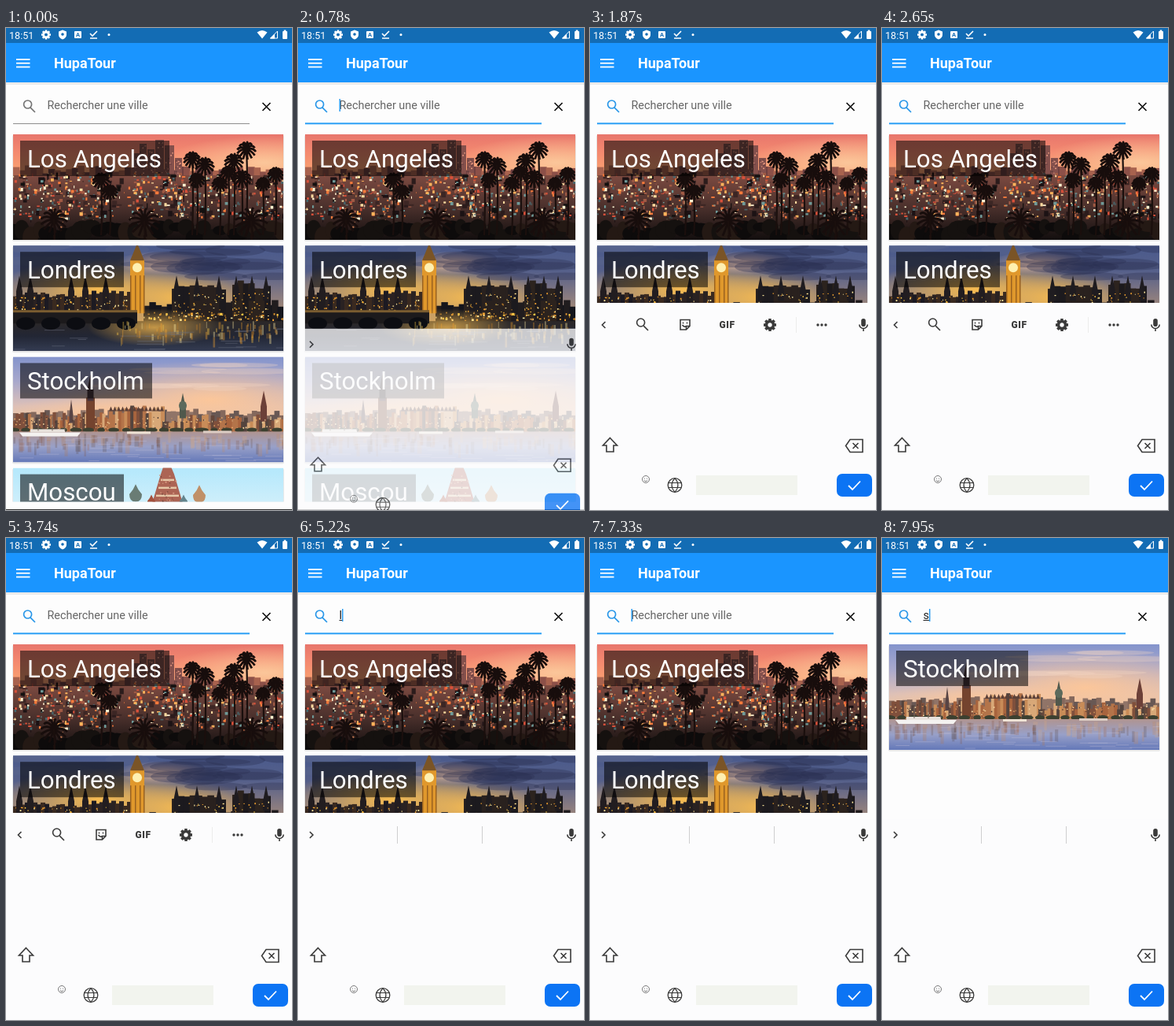
Animation, 364 px wide and 612 px high, one loop 8000 ms. Source, as an HTML page:

```html
<!DOCTYPE html>
<html lang="fr">
<head>
<meta charset="utf-8">
<title>HupaTour</title>
<style>
  html, body { margin: 0; width: 100%; height: 100%; overflow: hidden; background: #fdfdfd; }
  svg { display: block; width: 100%; height: 100%; font-family: Roboto, Arial, sans-serif; }
  .line { fill: none; stroke: #3a3a3a; stroke-width: 1.6; }
  .name { font-size: 31.3px; fill: #fff; }
  .field { font-size: 14.4px; }
</style>
</head>
<body>
<svg id="stage" viewBox="0 0 364 612"></svg>
<script>
const LOOP = 8000, PITCH = 141.2;
const BLUE = '#1a95ff', DARK_BLUE = '#136cb4', INK = '#3a3a3a';

let seed = 7;
const rnd = (a = 0, b = 1) => {
  seed = (seed * 1664525 + 1013904223) % 4294967296;
  return a + (b - a) * seed / 4294967296;
};
const pick = list => list[Math.floor(rnd(0, list.length))];
const many = (n, fn) => Array.from({ length: n }, (_, i) => fn(i)).join('');
const f1 = v => +v.toFixed(1);
const rect = (x, y, w, h, fill, more = '') =>
  `<rect x="${f1(x)}" y="${f1(y)}" width="${f1(w)}" height="${f1(h)}" fill="${fill}" ${more}/>`;
const oval = (x, y, rx, ry, fill, more = '') =>
  `<ellipse cx="${f1(x)}" cy="${f1(y)}" rx="${f1(rx)}" ry="${f1(ry)}" fill="${fill}" ${more}/>`;
const path = (d, fill, more = '') => `<path d="${d}" fill="${fill}" ${more}/>`;
const stroke = (d, more = '') => `<path class="line" d="${d}" ${more}/>`;
const grad = (id, ...stops) =>
  `<linearGradient id="${id}" x2="0" y2="1">${stops.map((c, i) =>
    `<stop offset="${i / (stops.length - 1)}" stop-color="${c}"/>`).join('')}</linearGradient>`;
const glow = (id, color) => `<radialGradient id="${id}"><stop stop-color="${color}"/>` +
  `<stop offset="1" stop-color="${color}" stop-opacity="0"/></radialGradient>`;
const sprinkle = (n, x0, x1, y0, y1, colors, size = 2) => many(n, () =>
  rect(rnd(x0, x1), rnd(y0, y1), rnd(.8, size), rnd(.8, size), pick(colors)));
const skyline = (n, x0, x1, top, low, base, colors) => many(n, i => {
  const w = (x1 - x0) / n, y = rnd(top, low);
  return rect(x0 + i * w, y, w + 1, base - y, pick(colors));
});
const spire = (x, top, base, w, fill) =>
  path(`M${x - w} ${base}V${top + 20}L${x} ${top}L${x + w} ${top + 20}V${base}z`, fill);

function palm(x, y, r) {
  const fronds = many(13, k => {
    const a = k / 13 * 6.283, dx = Math.cos(a) * r, dy = Math.sin(a) * r * .85;
    return `M${x} ${y}Q${f1(x + dx * .6)} ${f1(y + dy - 3)} ${f1(x + dx)} ${f1(y + dy + 3)}`;
  });
  return `<path d="${fronds}" stroke="#170d0c" stroke-width="2.8" fill="none"/>` +
    `<path d="M${x} ${y}q2 40 0 ${128 - y}" stroke="#1a0f0d" stroke-width="2.2" fill="none"/>`;
}

function losAngeles() {
  const lamps = ['#ffb35c', '#ffdca0', '#f47a3c', '#d8503a', '#6f9a98', '#fff2d0', '#a05a44', '#49666c'];
  const dark = ['#1c1214', '#2c1c1c', '#3c2624', '#12100f'];
  return rect(0, 0, 344, 70, 'url(#laSky)') + oval(320, 36, 130, 34, 'url(#peach)') +
    skyline(46, 0, 344, 39, 50, 64, ['#8c5048', '#6c4040', '#a8624e']) +
    [[152, 24, 9], [161, 12, 9], [171, 19, 9], [181, 7, 11], [193, 14, 12], [206, 30, 9]].map(([x, y, w]) =>
      rect(x, y, w, 56 - y, '#84504c') + sprinkle(14, x, x + w - 2, y + 2, 54, ['#e89a80', '#5c3a3c'])).join('') +
    rect(0, 52, 344, 82, 'url(#laLand)') +
    sprinkle(130, 0, 344, 48, 104, dark, 9) +
    sprinkle(230, 0, 344, 48, 76, lamps, 4) +
    sprinkle(330, 0, 344, 66, 106, lamps, 4.4) +
    sprinkle(60, 0, 344, 104, 126, ['#9a5638', '#4c4a3a', '#c87c50', '#3a4a48'], 3) +
    many(32, i => oval(i * 11, rnd(116, 134), rnd(7, 14), rnd(5, 14), pick(['#15110f', '#241914', '#0d0b0b']))) +
    [[112, 58, 11], [123, 72, 10], [52, 108, 17], [167, 110, 20], [228, 31, 11], [244, 39, 12], [234, 57, 10],
     [263, 62, 10], [281, 34, 12], [297, 19, 12], [291, 55, 12], [274, 48, 10], [318, 62, 9], [334, 50, 10],
     [303, 110, 21]].map(p => palm(...p)).join('');
}

function londres() {
  const gold = ['#ffca48', '#f0a030', '#b87a28', '#ffeaa0'];
  const stone = ['#1c1a22', '#2a2222', '#3a2a20'];
  return rect(0, 0, 344, 98, 'url(#ldSky)') +
    oval(110, 56, 130, 40, 'url(#amber)') + oval(215, 66, 95, 34, 'url(#amber)') +
    oval(190, 22, 60, 15, 'url(#peach)') +
    many(18, () => oval(rnd(170, 344), rnd(0, 40), rnd(22, 55), rnd(4, 9), '#2a3050', 'opacity=".36"')) +
    many(8, () => oval(rnd(0, 150), rnd(0, 22), rnd(20, 45), rnd(3, 8), '#59658c', 'opacity=".4"')) +
    skyline(30, 0, 150, 56, 66, 90, stone) +
    [8, 22, 74, 92, 118].map(x => spire(x, 38, 86, 4, '#221d20')).join('') +
    sprinkle(80, 0, 146, 64, 84, gold) +
    skyline(24, 166, 344, 68, 78, 98, ['#14151c', '#201c1e']) +
    skyline(9, 202, 270, 50, 56, 96, ['#1c1a1e', '#29211e']) +
    skyline(7, 279, 327, 44, 55, 96, ['#2c231e', '#1c191c']) +
    [208, 234, 262, 284, 304, 322].map(x => spire(x, 38, 70, 4, '#1f1c20')).join('') +
    sprinkle(60, 204, 268, 60, 92, gold) + sprinkle(50, 279, 326, 58, 92, gold) +
    sprinkle(75, 166, 344, 84, 96, gold, 3) +
    rect(149, 18, 18, 68, '#e0982c') + path('M149 19L154 7L158 -3L162 7L167 19z', '#7a5426') +
    [149, 155, 161, 166].map(x => rect(x, 38, 1.5, 48, '#9a6220')).join('') +
    oval(158, 28, 6, 6, '#fff0b0') +
    rect(0, 96, 344, 38, 'url(#ldWater)') +
    oval(180, 104, 85, 24, 'url(#amber)', 'opacity=".75"') +
    rect(0, 82, 158, 4, '#7a5c30') + rect(0, 85, 158, 14, '#1c1a1c') +
    many(5, i => oval(16 + i * 32, 99, 12, 8, '#0c0d12')) +
    many(90, () => rect(rnd(130, 335), rnd(96, 118), rnd(1, 3), rnd(3, 13), pick(gold), 'opacity=".38"')) +
    many(25, () => rect(rnd(0, 344), rnd(104, 132), rnd(10, 40), 1, '#6a7082', 'opacity=".45"'));
}

function stockholm() {
  const walls = ['#a8643e', '#c88c58', '#80503c', '#b4744a', '#d8a878', '#64483c', '#54443e'];
  const panes = ['#f7d6a0', '#503a34', '#e8a864'];
  return rect(0, 0, 344, 94, 'url(#stSky)') +
    oval(250, 55, 190, 50, 'url(#peach)') + oval(120, 72, 130, 25, 'url(#peach)') +
    many(9, () => oval(rnd(120, 344), rnd(8, 46), rnd(30, 70), rnd(2, 4), '#f4d8c4', 'opacity=".3"')) +
    skyline(60, 0, 344, 66, 75, 94, ['#84685c', '#685854', '#907468']) +
    skyline(40, 0, 126, 70, 82, 96, walls) + skyline(18, 122, 192, 62, 74, 96, walls) +
    skyline(40, 190, 344, 73, 84, 96, walls) +
    many(14, i => path(`M${122 + i * 5} 69l2.500-6 2.500 6z`, '#5c4038')) +
    rect(93, 52, 11, 40, '#74432e') + spire(98.5, 22, 56, 4, '#46343a') +
    spire(216, 46, 78, 4, '#50584c') + oval(216, 62, 5, 6, '#5c6a5c') +
    spire(319, 43, 82, 4, '#6c4038') + spire(74, 54, 84, 2.5, '#584444') +
    sprinkle(180, 0, 344, 76, 94, panes) +
    many(22, i => oval(i * 16, 93, rnd(4, 9), 3, '#3c4030')) +
    rect(0, 95, 344, 39, 'url(#stWater)') +
    many(90, () => rect(rnd(0, 344), rnd(96, 112), rnd(2, 6), rnd(4, 18), pick(walls), 'opacity=".24"')) +
    many(35, () => rect(rnd(0, 344), rnd(98, 132), rnd(12, 40), 1, '#c0bcd8', 'opacity=".35"')) +
    path('M8 96h78l-4 5h-70z', '#f4f2f0') + rect(22, 92, 44, 4, '#e8e2dc') +
    path('M32 94V79M50 94V76M66 94V81', 'none', 'stroke="#776860"') +
    rect(145, 95, 30, 3, '#eee2d4') + rect(242, 94, 36, 3, '#dccdc4');
}

function moscou() {
  const dome = (x, y, r, c) => path(`M${x} ${y - r * 1.8}Q${x + r * .3} ${y - r} ${x + r} ${y - r * .2}Q${x + r} ${y + r} ${x} ${y + r}Q${x - r} ${y + r} ${x - r} ${y - r * .2}Q${x - r * .3} ${y - r} ${x} ${y - r * 1.8}z`, c);
  return rect(0, 0, 344, 134, 'url(#moSky)') +
    rect(154, 44, 92, 90, '#a0604e') +
    path('M176 48L188 8L192 -4L200 -4L205 8L217 48z', '#ac6454') +
    [14, 24, 34].map((y, i) => rect(188 - i * 3, y, 17 + i * 6, 2.5, '#e6c8a8')).join('') +
    sprinkle(30, 184, 208, 8, 42, ['#74483c', '#d89c84']) +
    dome(156, 35, 8, '#6a7c74') + dome(237, 36, 8, '#c09068') + dome(176, 43, 5, '#a4503c') + dome(217, 43, 5, '#64848c');
}

const photos = [['Los Angeles', 190, losAngeles], ['Londres', 132, londres],
                ['Stockholm', 168, stockholm], ['Moscou', 132, moscou]];
const card = ([name, w, draw], i) => `<g id="card${i}">` +
  rect(-1, 1, 346, 135, '#e9e9e9', 'rx="2"') +
  `<g clip-path="url(#photo)">${draw()}</g>` +
  rect(9, 8, w, 45, '#000', 'opacity=".54"') +
  `<text class="name" x="18" y="41.500">${name}</text></g>`;

const gear = (x, y, r, c) => `<g transform="translate(${x} ${y})">` +
  many(8, k => rect(-r * .22, -r, r * .44, r * .6, c, `transform="rotate(${k * 45})"`)) +
  `<circle r="${r * .56}" fill="none" stroke="${c}" stroke-width="${r * .45}"/></g>`;
const lens = (x, y) => `M${x + 2.4} ${y + 2.4}l5.600 5.600M${x + 3.6} ${y - 2}a5 5 0 1 1-10 0a5 5 0 1 1 10 0`;

const header =
  rect(0, 0, 364, 70, BLUE) + rect(0, 0, 364, 19, DARK_BLUE) + rect(0, 69, 364, 3, '#ebebeb') +
  `<text x="4" y="13.500" font-size="12.600" fill="#fff">18:51</text>` + gear(51, 8.5, 6, '#fff') +
  path('M72 2.500l5 2v4q0 4-5 6q-5-2-5-6v-4z', '#fff') + oval(72, 8, 1.8, 1.8, DARK_BLUE) +
  rect(87, 4, 9, 9, '#fff', 'rx="1"') +
  `<text x="91.500" y="11.300" font-size="7.500" font-weight="700" text-anchor="middle" fill="${DARK_BLUE}">A</text>` +
  path('M107 7l3 3 6-6M107 13h9', 'none', 'stroke="#fff" stroke-width="1.600"') + oval(131, 8.5, 1.5, 1.5, '#fff') +
  path('M319.500 5.500q6.500-5 13 0L326 13.500z', '#fff') +
  path('M345.500 4v9h-9z', 'none', 'stroke="#fff"') + path('M342 7.500v6h-6z', '#fff') +
  rect(352, 4, 6, 10, '#fff', 'rx="1"') + rect(353.7, 2.5, 2.6, 2, '#fff') +
  [40, 44.8, 49.6].map(y => rect(13, y - 1, 17.5, 1.8, '#fff')).join('') +
  `<text x="61" y="51" font-size="18" font-weight="600" fill="#fff">HupaTour</text>`;

const search = `<path id="lens" d="${lens(29, 99)}" fill="none" stroke-width="1.700"/>` +
  `<text id="hint" class="field" x="52.500" y="102.500" fill="#666">Rechercher une ville</text>` +
  `<text id="typed" class="field" x="52.500" y="102.500" fill="#222"></text>` +
  rect(52.5, 104, 0, 1, '#222', 'id="mark"') + rect(52.5, 90, 1.5, 16, '#2a9bf0', 'id="caret"') +
  rect(9, 121, 301, 1, '#8e8e8e') + rect(9, 120.3, 301, 2, '#2a9ff5', 'id="focus"') +
  path('M326.500 95l10 10m0-10l-10 10', 'none', 'stroke="#111" stroke-width="1.700"');

const tools = stroke('M19.500 373l-4 4 4 4') + stroke(lens(66, 376)) +
  stroke('M115 370.500h12v8l-4.500 4.500h-7.500zM127 378.500h-4.500v4.500M117.500 377q3 4 5.500 1', 'stroke-width="1.400"') +
  oval(118.5, 374.5, .9, .9, INK) + oval(123.5, 374.5, .9, .9, INK) +
  `<text x="174.500" y="381.300" font-size="12" font-weight="900" text-anchor="middle" letter-spacing=".6" fill="${INK}">GIF</text>` +
  gear(229, 377, 8, INK) + rect(262, 367, 1, 20, '#ececec') +
  [290, 295, 300].map(x => oval(x, 377, 1.7, 1.7, INK)).join('');
const words = stroke('M15 373l4 4-4 4') +
  `<g id="bars">${rect(126, 366, 1, 22, '#cfcfcf')}${rect(234, 366, 1, 22, '#cfcfcf')}</g>` +
  `<text id="guess" x="171" y="383" font-size="15.500" font-weight="700" text-anchor="middle" fill="#222">L</text>`;
const keys = rect(0, 357, 364, 260, '#fcfcfd') +
  `<g id="tools">${tools}</g><g id="words">${words}</g>` +
  rect(345.2, 369, 5.6, 10, INK, 'rx="2.800"') + stroke('M342.800 376.500a5.200 5 0 0 0 10.400 0M348 381.500v3.500', 'stroke-width="1.500"') +
  stroke('M25.500 520.500l9 9.500h-4.500v8h-9v-8h-4.500z') +
  stroke('M331 522.500h16v16h-16l-5.500-8zM334.500 527l7 7m0-7l-7 7') +
  `<g opacity=".75"><circle cx="71" cy="573" r="4.500" fill="none" stroke="${INK}" stroke-width=".9"/>` +
  path('M68.800 574.500q2.200 2.500 4.400 0', 'none', `stroke="${INK}" stroke-width=".9"`) +
  oval(69.5, 572, .6, .6, INK) + oval(72.5, 572, .6, .6, INK) + '</g>' +
  `<circle cx="108" cy="580.500" r="8.800" fill="none" stroke="${INK}" stroke-width="1.300"/>` +
  path('M108 571.700q-8 8.800 0 17.600q8-8.800 0-17.600M100 577.500h16M100 583.500h16', 'none', `stroke="${INK}" stroke-width="1.100"`) +
  rect(135, 568, 129, 25, '#f2f4ee', 'id="space"') +
  rect(314, 566, 45, 29, '#0c74f4', 'rx="7"') + path('M329 581l5 5 10-10.500', 'none', 'stroke="#fff" stroke-width="1.800"');

document.getElementById('stage').innerHTML = '<defs>' +
  grad('laSky', '#e8766c', '#f48a70', '#f8a070', '#d87c5c') + grad('laLand', '#7c4a40', '#4a302c', '#120e0e') +
  grad('ldSky', '#4a5a8c', '#56608a', '#8a7c80', '#b8946c') + grad('ldWater', '#2c2828', '#222634', '#343c52') +
  grad('stSky', '#8494cc', '#a8a8cc', '#dcc0b8', '#f4cc9c') + grad('stWater', '#b09490', '#98a0c8', '#6478b8') +
  grad('moSky', '#b4e8fc', '#dcf2fa', '#fbeee4') +
  glow('peach', '#fbc69a') + glow('amber', '#f8bc50') +
  '<clipPath id="photo"><rect width="344" height="134"/></clipPath>' +
  '<clipPath id="view"><rect id="port" y="72" width="364"/></clipPath></defs>' +
  rect(0, 0, 364, 612, '#fdfdfd') + rect(0, 611, 364, 1, '#333') +
  `<g clip-path="url(#view)">${photos.map(card).join('')}</g>` +
  header + search + `<g id="keys">${keys}</g>`;

const el = id => document.getElementById(id);
const set = (id, attrs) => { for (const k in attrs) el(id).setAttribute(k, attrs[k]); };
const show = (id, on) => set(id, { opacity: +on });
const ramp = (t, a, b) => Math.min(1, Math.max(0, (t - a) / (b - a)));

const typing = [[0, ''], [5070, 'l'], [5850, 'lo'], [6160, 'los'],
                [7010, 'lo'], [7170, 'l'], [7330, ''], [7720, 's']];

function draw(t) {
  const [since, text] = typing.filter(s => s[0] <= t).pop();
  const rise = ramp(t, 640, 860), focused = t >= 550;

  el('typed').textContent = text;
  const w = text ? el('typed').getComputedTextLength() : 0;
  show('hint', !text);
  set('mark', { width: w });
  set('caret', { x: 52.5 + w });
  const blink = since ? (t - since) % 1000 < 500 : t < 1000 || t % 1000 < 500;
  show('caret', focused && blink);
  set('lens', { stroke: focused ? '#2a97e8' : '#757575' });
  show('focus', ramp(t, 550, 700));

  let row = 0;
  photos.forEach(([name], i) => {
    const match = name.toLowerCase().startsWith(text);
    set('card' + i, { transform: `translate(9 ${f1(135 + row * PITCH)})`, display: match ? 'inline' : 'none' });
    if (match) row++;
  });
  set('port', { height: (rise < 1 ? 601.5 : 349) - 72 });

  set('keys', { transform: `translate(0 ${f1(69 * (1 - rise))})`, opacity: Math.min(1, rise * 1.2) });
  show('space', rise === 1);
  const open = ramp(t, 1000, 1160) * (1 - ramp(t, 5070, 5170));
  show('tools', open);
  show('words', 1 - open);
  show('bars', t >= 5070);
  show('guess', t >= 5380 && t < 7010);
}

function tick() {
  draw(performance.now() % LOOP);
  requestAnimationFrame(tick);
}
tick();
</script>
</body>
</html>
```
